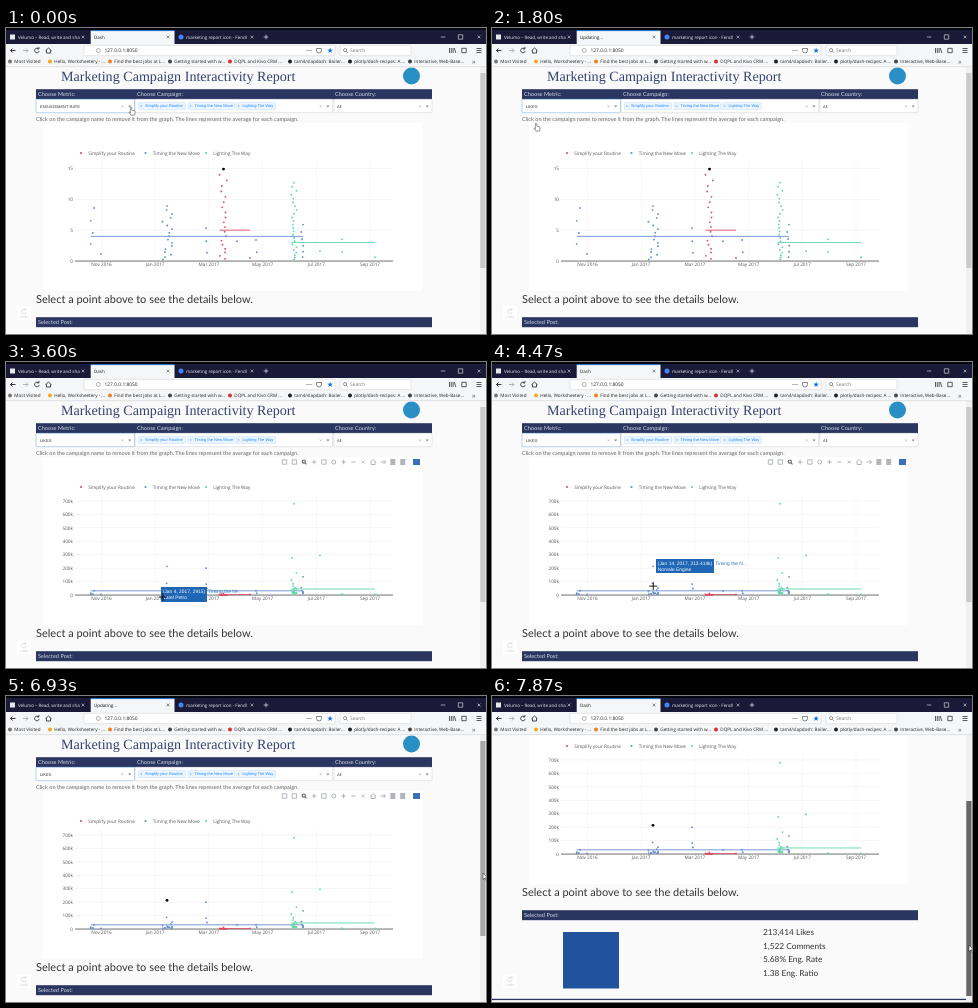
Recreate the animation shown at these times as an HTML page. Size 480x306 px, loop 8000 ms.

```html
<!DOCTYPE html>
<html lang="en">
<head>
<meta charset="utf-8">
<title>Dash</title>
<style>
html, body { margin: 0; width: 100%; height: 100%; overflow: hidden; background: #fafafa; }
svg { display: block; width: 100vw; height: 100vh; }
text { font-family: "Open Sans", sans-serif; text-rendering: geometricPrecision; white-space: pre; }
.lato { font-family: Lato, sans-serif; }
.sans { font-family: "Liberation Sans", Arial, sans-serif; }
.serif { font-family: "Liberation Serif", serif; }
.mid { text-anchor: middle; }
.end { text-anchor: end; }
</style>
</head>
<body>
<svg id="stage" viewBox="0 0 480 306"></svg>
<script>
const NAVY = '#2a3660', PALE = '#d4d8e4';
const LOOP = 8000, OPEN = 150, PICK = 1620, REDRAW = 2250, CLICKED = 6790;

const rect = (x, y, w, h, fill, extra = '') =>
  `<rect x="${x}" y="${y}" width="${w}" height="${h}" fill="${fill}" ${extra}/>`;
const frame = (x, y, w, h, fill, line) => rect(x, y, w, h, fill, `stroke="${line}" stroke-width=".5" rx=".8"`);
const text = (x, y, s, size, fill, cls = '', id = '') =>
  `<text x="${x}" y="${y}" font-size="${size}" fill="${fill}" class="${cls}" ${id && `id="${id}"`}>${s}</text>`;
const dot = (x, y, r, fill, id = '') =>
  `<circle cx="${x}" cy="${y}" r="${r}" fill="${fill}" ${id && `id="${id}"`}/>`;
const path = (d, stroke, w = 0.7, fill = 'none') =>
  `<path d="${d}" stroke="${stroke}" stroke-width="${w}" fill="${fill}"/>`;
const group = (id, ...parts) => `<g id="${id}">${parts.join('')}</g>`;

// Small icons drawn around their centre
const icons = {
  cross: 'm-1.4-1.4l2.8 2.8m0-2.8l-2.8 2.8',
  small: 'm-.9-.9l1.8 1.800m0-1.800l-1.800 1.800',
  plus: 'm-2.300 0h4.600m-2.300-2.300v4.600',
  minus: 'm-2.200 0h4.400',
  box: 'm-2.200-2.200h4.400v4.400h-4.400z',
  ring: 'm2 0a2 2 0 1 1-4 0a2 2 0 1 1 4 0',
  lens: 'm1.200-.400a1.600 1.600 0 1 1-3.200 0a1.600 1.600 0 1 1 3.200 0m-.400 1.200l1.500 1.500',
  house: 'm-3 .200l3-2.700 3 2.700m-5-.500v2.800h4v-2.800',
  back: 'm2.500 0h-5l2-2m-2 2l2 2',
  forward: 'm-2.500 0h5l-2-2m2 2l-2 2',
  turn: 'm1.600-1.600a2.300 2.300 0 1 0 .600 2m-.300-4v2h-2',
  shield: 'm-2.500-2h5v2a2.500 2.500 0 0 1-5 0z',
  bars: 'm-2.500-2h5m-5 2h5m-5 2h5',
  caret: 'm-1.600-.800h3.200l-1.600 1.900z'
};
const icon = (kind, x, y, color, w = 0.7) => path(`M${x} ${y}${icons[kind]}`, color, w, kind === 'caret' ? color : 'none');

let seed = 7;
const random = () => (seed = (seed * 16807) % 2147483647) / 2147483647;

// Scales: engagement rate in percent, likes in thousands
const scales = [v => 233 - 6.17 * v, v => 233 - 0.1343 * v];

// Cluster: x, spread, posts, highest rate, highest likes
const series = [
  { name: 'Simplify your Routine', color: '#dc5268', legend: 75, mean: [5, 3],
    clusters: [[217.5, 4, 20, 14.9, 12], [244, 0, 1, 0.5, 4]] },
  { name: 'Timing the New Move', color: '#6890cf', legend: 139.5, mean: [4, 31],
    clusters: [[161, 6, 17, 8.9, 213.4], [88, 8, 5, 8.6, 32], [200, 2, 3, 5.3, 200],
      [231, 0, 1, 3.2, 30], [250, 1, 2, 3.4, 32], [297, 2, 6, 5.9, 135]] },
  { name: 'Lighting The Way', color: '#62d9a8', legend: 200, mean: [3, 45],
    clusters: [[288, 3, 24, 12.7, 680], [314, 0, 1, 1.6, 295], [336, 4, 2, 3.5, 6], [369, 0, 1, 0.6, 5]] }
];
for (const s of series)
  s.posts = s.clusters.flatMap(([x, spread, n, rate, likes]) => Array.from({ length: n }, (_, i) => ({
    x: i ? x + spread * (2 * random() - 1) : x,
    values: [rate * (1 - i / n) ** 1.25, likes / (i + 1) ** 1.3]
  })));

const monthX = i => 95.5 + 53.7 * i;
const months = ['Nov 2016', 'Jan 2017', 'Mar 2017', 'May 2017', 'Jul 2017', 'Sep 2017'];

function plot(id, metric, count, step, label) {
  const scale = scales[metric], out = [];
  for (let i = 0; i < count; i++) {
    const y = scale(i * step);
    out.push(rect(69, y - 0.25, 318, 0.5, '#ececec'), text(67, y + 1.7, label(i * step), 4.7, '#555', 'end'));
  }
  out.push(rect(69, 232.6, 318, 0.9, '#666'));
  for (const s of series) {
    const xs = s.posts.map(p => p.x), left = Math.min(...xs);
    out.push(rect(left, scale(s.mean[metric]) - 0.45, Math.max(...xs) - left, 0.9, s.color));
    for (const p of s.posts) out.push(dot(p.x, scale(p.values[metric]), 0.95, s.color));
  }
  return group(id, ...out);
}

const bar = y => rect(30, y, 396, 10, NAVY);
const label = (x, y, s) => text(x, y, s, 5.6, PALE, 'lato');
const field = (x, w, line) => frame(x, 71.3, w, 13.4, '#fff', line) +
  icon('small', x + w - 12, 78.3, '#999', 0.5) + icon('caret', x + w - 4.8, 78.3, '#888', 0);
const tag = (x, w, name) => frame(x, 74.5, w, 7, '#ebf5ff', '#c2e0ff') +
  icon('small', x + 2.6, 78, '#3a92f0', 0.4) + text(x + 6.4, 79.4, name, 4, '#2388f0', 'sans');

const options = ['ENGAGEMENT RATE', 'LIKES', 'COMMENTS', 'ENGAGEMENT RATIO'];
const menu = group('menu',
  frame(30, 85, 98.5, 36, '#fff', '#ccc'),
  rect(30.3, 85, 98, 9, '#ebf5ff', 'id="hover"'),
  ...options.map((o, i) => text(34, 91 + 9 * i, o, 4, '#555', 'sans')));

const tools = ['box', 'box', 'lens', 'plus', 'box', 'ring', 'plus', 'minus', 'cross', 'house', 'forward', 'bars', 'bars'];
const modebar = group('modebar',
  ...tools.map((kind, i) => icon(kind, 278.5 + 9.85 * i, 100, i === 2 || i > 10 ? '#666c78' : '#a0a5ae', i === 2 || i > 10 ? 1.2 : 0.8)),
  rect(407, 97, 7, 6, '#3c6fb8'));

const tip = (id, x, y, w, h, first, second) => group(id,
  rect(x, y, w, h, '#1f66b5'),
  text(x + 1.8, y + 6, first, 4.9, '#fff', 'sans'),
  text(x + 1.8, y + 12, second, 4.9, '#fff', 'sans'),
  text(x + w + 1.3, y + 6, 'Timing the N...', 4.9, '#2a6fc0', 'sans'));

const page = group('page',
  text(55, 53, 'Marketing Campaign Interactivity Report', 14.1, '#34436f', 'serif'),
  dot(405.5, 48, 8.5, '#2a8fc4'),
  bar(61.2), label(32, 68.3, 'Choose Metric:'), label(131, 68.3, 'Choose Campaign:'), label(329, 68.3, 'Choose Country:'),
  field(30, 98.5, '#6fa8e6'), field(129.2, 197.5, '#ccc'), field(328, 98, '#ccc'),
  text(34, 79.7, '', 4, '#333', 'sans', 'metric'),
  tag(132.5, 47, series[0].name), tag(182, 46.5, series[1].name), tag(230, 39.5, series[2].name),
  text(331, 79.7, 'All', 4, '#333', 'sans'),
  text(30, 93, 'Click on the campaign name to remove it from the graph. The lines represent the average for each campaign.', 5.55, '#666', 'lato'),
  rect(37, 95, 379, 168, '#fff'),
  ...series.map(s => dot(s.legend, 125, 1.1, s.color) + text(s.legend + 7.2, 126.7, s.name, 4.7, '#555')),
  ...months.map((m, i) => rect(monthX(i) - 0.25, 133, 0.5, 100, '#f1f1f1') + text(monthX(i), 238.3, m, 4.7, '#555', 'mid')),
  plot('rate', 0, 4, 5, v => v),
  plot('likes', 1, 8, 100, v => v ? v + 'k' : 0),
  dot(0, 0, 1.4, '#000', 'chosen'),
  modebar,
  tip('tipA', 155, 225, 46, 15, '(Jan 4, 2017, 2915)', 'Varel Petro'),
  tip('tipB', 164, 197, 58, 14, '(Jan 14, 2017, 213.414k)', 'Norvale Engine'),
  text(30, 274.5, 'Select a point above to see the details below.', 11, '#333', 'lato'),
  bar(289.2), label(32, 296.3, 'Selected Post:'),
  rect(71, 311, 56, 56.5, '#20539c'),
  ...['213,414 Likes', '1,522 Comments', '5.68% Eng. Rate', '1.38 Eng. Ratio'].map((s, i) =>
    text(271, 314.3 + 13.4 * i, s, 8.3, '#333', 'lato')),
  rect(0, 377.8, 474, 1.3, NAVY),
  menu);

const bookmarks = ['Most Visited', 'Hello, Worksheetery - ...', 'Find the best jobs at L...', 'Getting started with w...',
  'DQPL and Kivo CRM ...', 'tam4/slapdash: Boiler...', 'plotly/dash-recipes: A ...', 'Interactive, Web-Base...'];
const marks = ['#777', '#f5a623', '#f08020', '#444', '#d93030', '#222', '#222', '#444'];
const bookmarkX = i => i ? 60 * i - 16 : 4;

const chrome = group('chrome',
  rect(0, 0, 480, 16, '#1b1938'), rect(0, 0, 480, 2, '#05050c'),
  rect(0, 16, 480, 23, '#f5f6f7'), rect(0, 38.6, 480, 0.5, '#c8c8c8'),
  rect(84.7, 2.7, 83.8, 13.5, '#f5f6f7'), rect(84.7, 2.4, 83.8, 0.7, '#0a84ff'),
  rect(4, 6.5, 5, 5, '#e8e8e8'), dot(175, 9, 2.5, '#4285f4'),
  text(12, 10.7, 'Velumo – Read, write and sha', 4.5, '#eee'),
  text(88, 10.7, '', 4.5, '#111', '', 'title'),
  text(180, 10.7, 'marketing report icon - Fendl', 4.5, '#eee'),
  ...[77, 162, 246].map(x => icon('cross', x, 9, x === 162 ? '#444' : '#ddd', 0.6)),
  icon('plus', 260, 9, '#eee'), icon('minus', 437, 9, '#eee', 0.6),
  icon('box', 454.5, 9, '#eee', 0.6), icon('cross', 473, 9, '#eee', 0.6),
  icon('back', 7, 22.5, '#222', 0.9), icon('forward', 19.5, 22.5, '#aaa', 0.9),
  icon('turn', 31, 22.5, '#222', 0.8), icon('house', 42.5, 22.5, '#222', 0.8),
  frame(78, 17.3, 251, 10.4, '#fff', '#ccc'), frame(334, 17.3, 71, 10.4, '#fff', '#ccc'),
  icon('ring', 92.3, 22.5, '#666', 0.5), text(98.5, 24.2, '127.0.0.1:8050', 4.9, '#222'),
  ...[301, 303, 305].map(x => dot(x, 22.5, 0.5, '#444')),
  icon('shield', 313, 22.5, '#555', 0.7),
  text(324, 25, '★', 7.5, '#0a70e0', 'mid'),
  icon('lens', 339.5, 22.5, '#555', 0.6), text(344, 24.2, 'Search', 4.9, '#777'),
  path('M443.500 20v5m1.800-5v5m1.800-5v5m1.200-5l1.500 5', '#333', 0.8),
  icon('box', 458, 22.5, '#333', 0.8), icon('bars', 473, 22.5, '#333', 0.8),
  ...bookmarks.map((s, i) => dot(bookmarkX(i), 33.6, 2, marks[i]) + text(bookmarkX(i) + 4.3, 35.2, s, 4.6, '#222')),
  text(466, 36, '»', 7, '#555'));

const scrollbar = rect(474, 39, 6, 267, '#f0f0f0') + rect(474.3, 45, 5.2, 195, '#c9c9c9', 'id="thumb"');
const undo = rect(11, 278, 14, 14, '#fff', 'opacity=".85" rx="1"') +
  icon('turn', 18, 283.5, '#d0d0d0') + text(18, 290.2, 'undo', 3.8, '#ccc', 'mid');
const pointer = group('cursor',
  group('hand', path('M-.6 3V-2.500q.7-.9 1.400 0V.2l2.700.7q.8.3.6 1.200l-.5 3h-3.700l-2-2.700q.2-1 1.500.6z', '#333', 0.5, '#fff')),
  group('aim', path('M-4 0h8M0-4v8', '#000', 0.9)),
  group('arrow', path('M0-3v6.500l1.500-1.400 1 2 .9-.4-1-2h2z', '#111', 0.5, '#fff')));

document.getElementById('stage').innerHTML =
  rect(0, 0, 480, 306, '#fafafa') + page + undo + scrollbar + chrome + pointer;

const $ = id => document.getElementById(id);
const set = (id, attrs) => { for (const k in attrs) $(id).setAttribute(k, attrs[k]); };
const show = (id, on) => set(id, { display: on ? 'inline' : 'none' });
const within = (t, a, b) => t >= a && t < b;
const clamp = p => Math.min(1, Math.max(0, p));
const ease = p => p * p * (3 - 2 * p);

// Cursor stops: time, x, y
const stops = [[0, 125, 82], [1500, 44, 98], [2640, 44, 98], [3400, 157, 235], [3700, 157, 235],
  [5300, 166, 212], [6730, 166, 212], [6900, 477, 180], [LOOP, 477, 180]];

function cursorAt(t) {
  const i = stops.findIndex(s => s[0] > t);
  const [t0, x0, y0] = stops[i - 1], [t1, x1, y1] = stops[i];
  const p = ease((t - t0) / (t1 - t0));
  return [x0 + (x1 - x0) * p, y0 + (y1 - y0) * p];
}

function draw() {
  const t = performance.now() % LOOP;
  const dragging = t >= 7400, likes = t >= REDRAW;
  const scroll = dragging ? 3 + 72 * ease(clamp((t - 7470) / 390)) : 0;
  const [x, y] = cursorAt(t);

  set('page', { transform: `translate(0 ${-scroll})` });
  set('thumb', { y: 45 + scroll * 0.8, fill: dragging ? '#666' : t > 6880 ? '#a8a8a8' : '#c9c9c9' });
  $('title').textContent = within(t, 1780, REDRAW) || within(t, 6070, 7300) ? 'Updating...' : 'Dash';
  $('metric').textContent = options[t < PICK ? 0 : 1];

  show('menu', within(t, OPEN, PICK));
  set('hover', { y: 85 + 9 * Math.floor(3.99 * clamp((y - 85) / 36)) });
  show('rate', !likes);
  show('likes', likes);
  show('chosen', !likes || t >= CLICKED);
  set('chosen', likes ? { cx: 161, cy: scales[1](213.4) } : { cx: 217.5, cy: scales[0](14.9) });
  show('modebar', within(t, 2700, 7250));
  show('tipA', within(t, 3400, 4100));
  show('tipB', within(t, 4100, CLICKED));

  set('cursor', { transform: `translate(${x} ${y + scroll * 0.96})` });
  show('hand', t < 2670);
  show('aim', within(t, 2670, 6760));
  show('arrow', t >= 6760);
  requestAnimationFrame(draw);
}
draw();
</script>
</body>
</html>
```
